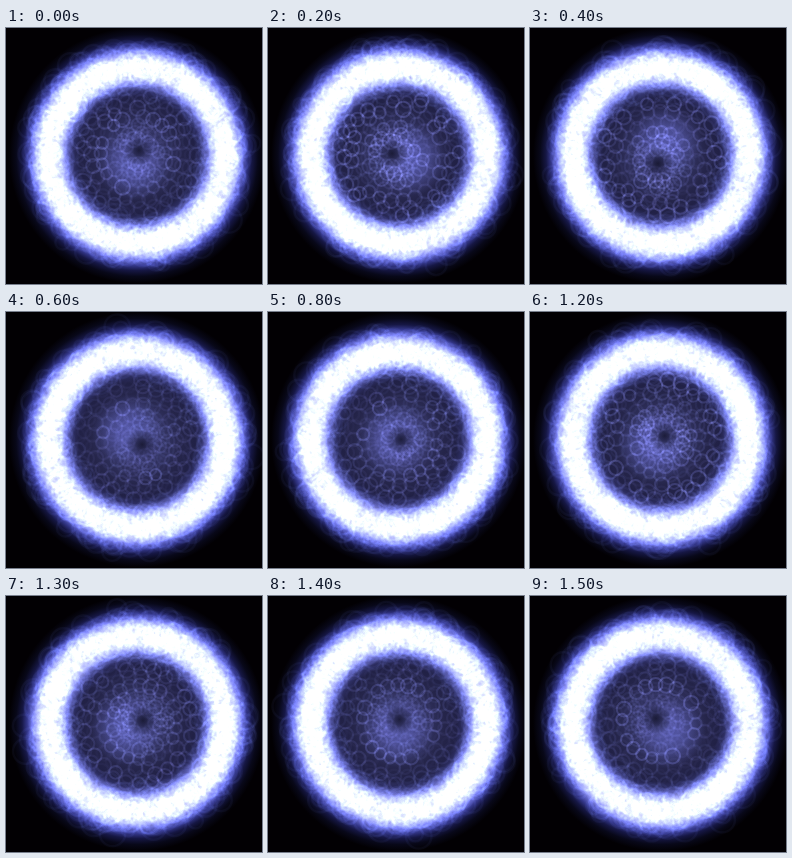
Animation, 256 px wide and 256 px high, one loop 1.6 s. Source, as an HTML page with a canvas:

```html
<!DOCTYPE html>
<html>
<head>
<meta charset="utf-8">
<style>
html, body { margin: 0; width: 100%; height: 100%; overflow: hidden; background: #020003; }
canvas { display: block; width: 100vmin; height: 100vmin; }
</style>
</head>
<body>
<canvas id="stage" width="256" height="256"></canvas>
<script>
const ctx = document.getElementById('stage').getContext('2d');
const LOOP = 1600, STEP = 100, TAU = Math.PI * 2;
const CX = 131, CY = 127.5;

let seed = 11;
const random = () => (seed = seed * 16807 % 2147483647) / 2147483647;
const spread = () => random() + random() + random() - 1.5;

// Radius, colour of the soft glow
const glow = [
  [0, '44,45,84'], [16, '50,51,98'], [30, '48,49,94'], [46, '37,37,74'],
  [58, '33,33,70'], [64, '45,46,98'], [70, '92,95,178'], [76, '156,159,228'],
  [82, '190,192,240'], [95, '190,192,240'], [100, '152,155,232'], [105, '98,102,200'],
  [110, '52,55,138'], [115, '22,23,68'], [121, '8,8,25'], [128, '2,0,3']
];

// Time and offset of the drifting dark eye
const eyePath = [
  [0, 2, -5], [200, -7, -2], [400, -3, 8], [600, 5, 5],
  [1000, -1, -5], [1300, 6, -3], [1500, -5, -5], [1600, 2, -5]
];

const sparks = Array.from({ length: 1700 }, () => ({
  angle: random() * TAU,
  radius: 89 + spread() * 18,
  size: 5 + random() * 8,
  turns: random() < 0.5 ? 1 : -1,
  sway: random() * TAU
}));

// Inner wreaths of bubbles: radius, count, bubble size, places moved per loop
const wreaths = [
  [13, 16, 7, 3], [20, 18, 7, -4], [28, 20, 7, 5],
  [37, 22, 7, -3], [46, 24, 7, 4], [54, 25, 7, -5], [60, 28, 7, 6]
].map(([radius, count, size, shift]) => ({
  radius, shift, count,
  phase: random() * TAU,
  bubbles: Array.from({ length: count }, () => ({ size: size * (0.8 + random() * 0.3), phase: random() * TAU }))
}));

function eyeAt(time) {
  const i = eyePath.findIndex(p => p[0] > time);
  const [t0, x0, y0] = eyePath[i - 1], [t1, x1, y1] = eyePath[i];
  const k = (time - t0) / (t1 - t0);
  return [x0 + (x1 - x0) * k, y0 + (y1 - y0) * k];
}

function blob(x, y, radius, stops) {
  const gradient = ctx.createRadialGradient(x, y, 0, x, y, radius);
  for (const [at, colour] of stops) gradient.addColorStop(at, colour);
  ctx.fillStyle = gradient;
  ctx.fillRect(0, 0, 256, 256);
}

function circle(x, y, radius, colour, alpha) {
  ctx.strokeStyle = `rgba(${colour},${alpha})`;
  ctx.beginPath();
  ctx.arc(x, y, radius, 0, TAU);
  ctx.stroke();
}

function draw(time) {
  const turn = time / LOOP * TAU;
  const [ex, ey] = eyeAt(time);

  ctx.globalCompositeOperation = 'source-over';
  blob(CX, CY, 128, glow.map(([r, colour]) => [r / 128, `rgb(${colour})`]));

  ctx.globalCompositeOperation = 'lighter';
  blob(CX - ex * 1.8, CY - ey * 1.8, 36, [
    [0, 'rgba(80,85,160,.42)'], [0.4, 'rgba(80,85,160,.3)'], [1, 'rgba(80,85,160,0)']
  ]);

  ctx.lineWidth = 2.2;
  for (const s of sparks) {
    const angle = s.angle + s.turns * turn;
    const radius = s.radius + 3 * Math.sin(turn * 2 + s.sway);
    circle(CX + radius * Math.cos(angle), CY + radius * Math.sin(angle), s.size, '125,132,235', 0.05);
  }

  ctx.lineWidth = 2;
  for (const w of wreaths) {
    const pull = 1 - w.radius / 62;
    const strength = 0.1 + 0.04 * Math.sin(w.phase + turn * 2);
    w.bubbles.forEach((b, i) => {
      const angle = (i + w.shift * time / LOOP) / w.count * TAU;
      const alpha = strength * (1 + 0.6 * Math.sin(b.phase + turn));
      circle(CX + ex * pull + w.radius * Math.cos(angle), CY + ey * pull + w.radius * Math.sin(angle),
        b.size, '115,120,195', alpha);
    });
  }

  ctx.globalCompositeOperation = 'source-over';
  blob(CX + ex, CY + ey, 15, [[0, 'rgba(14,14,32,.75)'], [0.4, 'rgba(18,18,40,.5)'], [1, 'rgba(18,18,40,0)']]);
}

let shown = -1;
function tick() {
  const step = Math.floor(performance.now() % LOOP / STEP);
  if (step !== shown) draw((shown = step) * STEP);
  requestAnimationFrame(tick);
}
tick();
</script>
</body>
</html>
```
